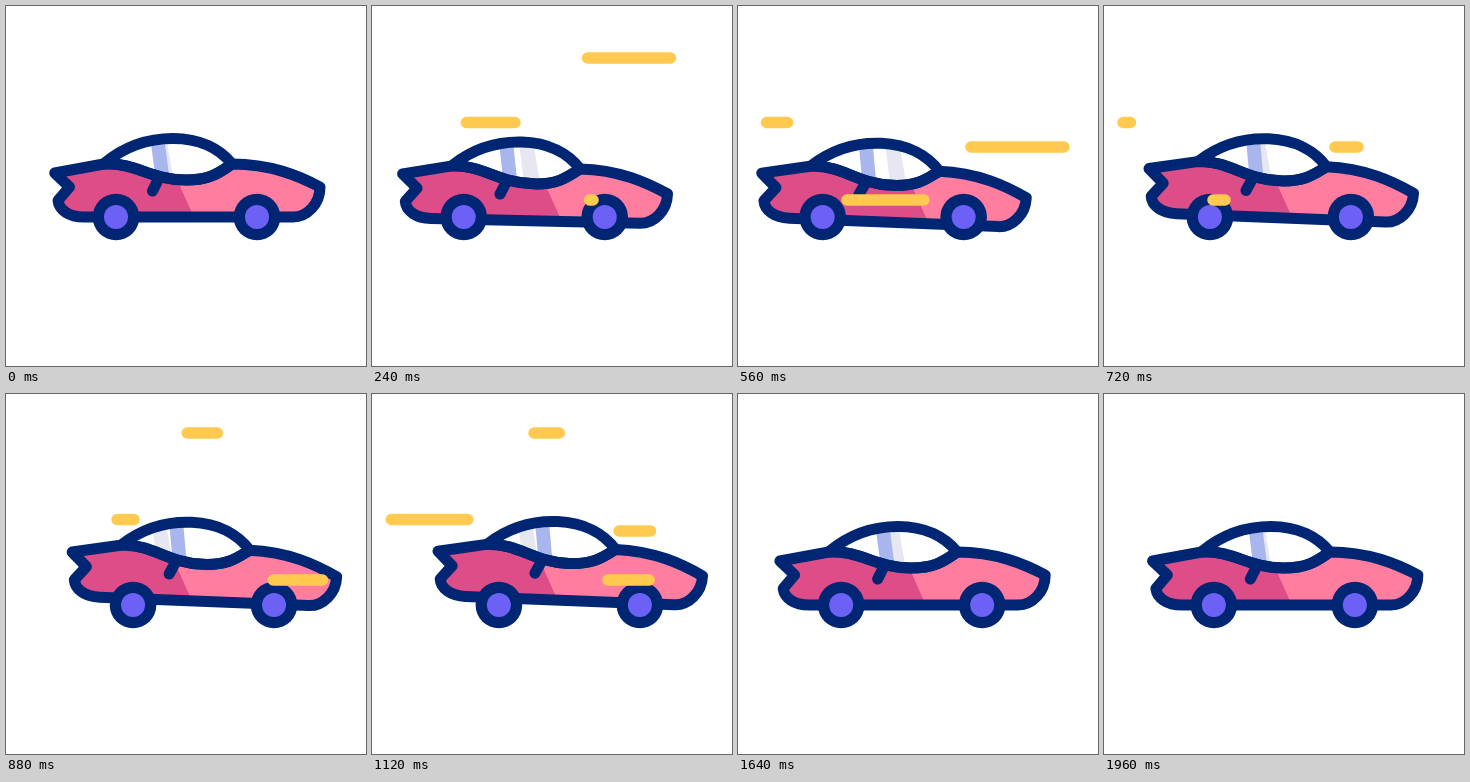
Write an HTML page with a canvas that moves like this. It is 360 by 360 pixels and loops after 2 s.

```html
<!DOCTYPE html>
<html lang="en">
<head>
<meta charset="utf-8">
<title>Car</title>
<style>
html, body { margin: 0; height: 100%; overflow: hidden; background: #fff; }
canvas { display: block; width: 360px; height: 360px; }
</style>
</head>
<body>
<canvas id="stage" width="360" height="360"></canvas>
<script>
const ctx = document.getElementById('stage').getContext('2d');
const LOOP = 2000;
const NAVY = '#002673';

const belt = 'C130 157 145 174 180 174 C205 174 214 166 226 158';
const body = new Path2D(`M48.7 167 L95 158.5 Q98 158 102 158 ${belt}
  C265 158 293 170 314 181 C314 198 301 211 287 211 L78 211
  C63 211 53 204 52 194.5 L63.5 181 Z`);
const glass = new Path2D(`M98 157.5 ${belt} C214 143 194 132.5 167 132.5 C143 132.5 119 140 98 157.5 Z`);
const handle = new Path2D('M152 174 L146.5 185');
const shade = new Path2D('M0 100 H138 L195 227 H0 Z');
const pillar = new Path2D('M144 130 h14 l6 46 h-14 Z');
const glare = new Path2D('M146 130 h14 l8 46 h-16 Z');

const smooth = p => p * p * (3 - 2 * p);
const easeOut = p => 1 - (1 - Math.min(1, Math.max(0, p))) ** 2;
const mix = (a, b, p) => a + (b - a) * p;

// Keys are [time, value] pairs; every track rests at 0 at both ends of the loop
function track(t, ...keys) {
  keys = [[0, 0], ...keys, [LOOP, 0]];
  const i = keys.findIndex(k => k[0] > t);
  const [t0, a] = keys[i - 1], [t1, b] = keys[i];
  return mix(a, b, smooth((t - t0) / (t1 - t0)));
}

function fill(path, color) {
  ctx.fillStyle = color;
  ctx.fill(path);
}

function disc(x, y, r, color) {
  ctx.fillStyle = color;
  ctx.beginPath();
  ctx.arc(x, y, r, 0, 7);
  ctx.fill();
}

// Fills a shape that stays put on the stage, seen only inside a moving one
function fillInside(frame, shape, color) {
  ctx.save();
  ctx.clip(frame);
  ctx.resetTransform();
  fill(shape, color);
  ctx.restore();
}

function drawCar(t) {
  const dx = track(t, [440, -32], [1000, 23.5], [1425, -10]);
  const dy = track(t, [440, 6.8], [1000, -5], [1580, 0]);
  const tilt = track(t, [440, 2.3], [1220, 2.3], [1580, 0]);

  ctx.save();
  ctx.translate(181 + dx, 174 + dy);
  ctx.rotate(tilt * Math.PI / 180);
  ctx.translate(-181, -174);
  fill(body, '#ff7d9f');
  fillInside(body, shade, '#dd4d88');
  fill(glass, '#fff');
  fillInside(glass, glare, '#e6e7f0');
  fill(pillar, '#a8b6ed');
  ctx.strokeStyle = NAVY;
  ctx.lineWidth = 11;
  for (const path of [body, glass, handle]) ctx.stroke(path);
  ctx.restore();

  for (const x of [110, 251]) {
    disc(x + dx, 211, 23.3, NAVY);
    disc(x + dx, 211, 12, '#6c61f4');
  }
}

// The head runs from right to left, the tail follows after a lag
function streak(age, y, right, left, lag = 270, span = 320) {
  const head = mix(right, left, easeOut(age / span));
  const tail = mix(right, left, easeOut((age - lag) / span));
  if (tail - head < 1.5) return;
  ctx.beginPath();
  ctx.moveTo(head, y);
  ctx.lineTo(tail, y);
  ctx.stroke();
}

function drawStreaks(t) {
  ctx.strokeStyle = '#ffca4f';
  ctx.lineWidth = 11.5;
  streak(t - 4, 52, 298.5, 209.5);
  streak(t - 12, 116.5, 180, 19, 140, 725);
  streak(t - 236, 194, 221, 109);
  streak(t - 286, 141, 329, 231);
  streak(t - 760, 186, 316.5, 236);
  streak(t - 760, 39, 211.5, 162);
  streak(t - 856, 125.5, 128, 16, 215);
  streak(t - 1050, 137, 278.5, 199);
}

function draw(t) {
  ctx.fillStyle = '#fff';
  ctx.fillRect(0, 0, 360, 360);
  ctx.lineCap = ctx.lineJoin = 'round';
  drawCar(t);
  drawStreaks(t);
}

const begin = performance.now();
function tick() {
  draw((performance.now() - begin) % LOOP);
  requestAnimationFrame(tick);
}
tick();
</script>
</body>
</html>
```
